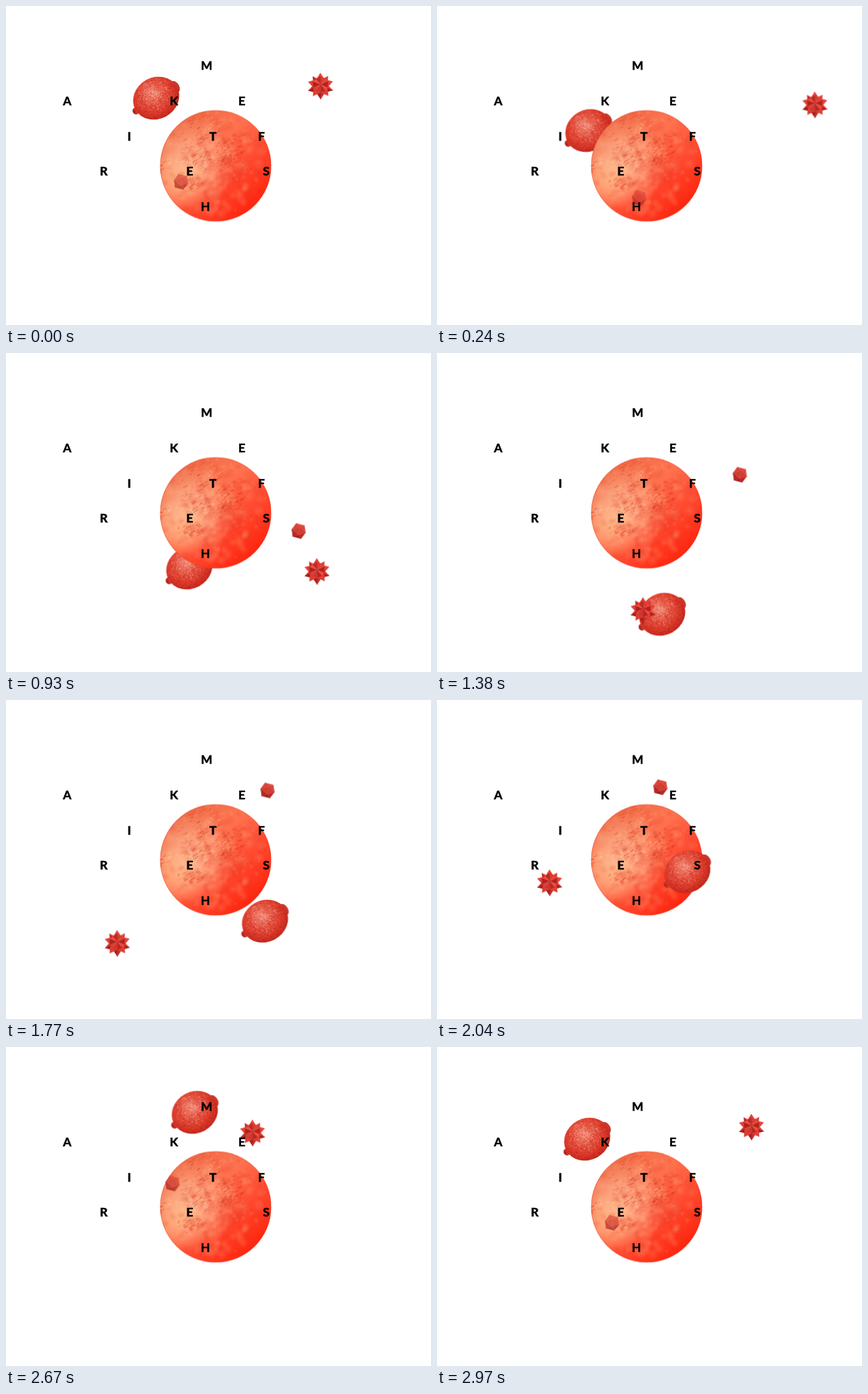
These frames come from a looping animation (600 px wide and 450 px high, 3 s). An HTML page with a canvas:

```html
<!DOCTYPE html>
<html lang="en">
<head>
<meta charset="utf-8">
<title>Orbiting fruit and solids</title>
<style>
  html, body { margin: 0; width: 100%; height: 100%; overflow: hidden; background: #fff; }
  canvas, svg { position: absolute; left: 0; top: 0; width: 600px; height: 450px; }
  text { font: 700 17px Lato, "Open Sans", sans-serif; text-anchor: middle; stroke: #000; stroke-width: .5px; }
</style>
</head>
<body>
<canvas id="stage" width="600" height="450"></canvas>
<svg viewBox="0 0 600 450">
  <text y="90" x="283.3">M</text>
  <text y="139.700" x="86.5 237 333">AKE</text>
  <text y="189.500" x="174 292 360.5">ITF</text>
  <text y="239.300" x="138 259.5 367.5">RES</text>
  <text y="289" x="281.5">H</text>
</svg>
<script>
const LOOP = 3000, STEP = 30, CYCLE = LOOP - STEP;
const SUN = [296, 225.5], R = 78.5;
const ctx = document.getElementById('stage').getContext('2d');

let seed = 7;
const rand = () => (seed = (seed * 16807) % 2147483647) / 2147483647;
const spread = () => rand() + rand() + rand() - 1.5;
const rgba = (rgb, a) => `rgba(${rgb},${a})`;
const clamp = v => Math.min(1, Math.max(0, v));

// Off-screen picture with its origin in the middle
function sprite(size, paint) {
  const c = document.createElement('canvas');
  c.width = c.height = size;
  const g = c.getContext('2d');
  g.translate(size / 2, size / 2);
  paint(g);
  return c;
}

function ramp(gradient, ...colors) {
  colors.forEach((c, i) => gradient.addColorStop(i / (colors.length - 1), c));
  return gradient;
}

function spot(g, x, y, r, rgb, alpha) {
  g.fillStyle = ramp(g.createRadialGradient(x, y, 0, x, y, r), rgba(rgb, alpha), rgba(rgb, 0));
  g.fillRect(x - r, y - r, 2 * r, 2 * r);
}

function paintPlanet(g) {
  g.beginPath();
  g.arc(0, 0, R, 0, 7);
  g.clip();
  g.fillStyle = ramp(g.createLinearGradient(-50, -58, 52, 58), '#f06a46', '#ff7450', '#ff4a30', '#ff260f');
  g.fillRect(-R, -R, 2 * R, 2 * R);
  spot(g, -34, -4, 64, '255,210,172', .8);
  spot(g, -52, 22, 44, '255,196,140', .5);

  // Soft mottling
  for (let i = 0; i < 320; i++) {
    const pale = rand() < .5;
    spot(g, spread() * 70, spread() * 70, 2 + rand() * 7, pale ? '255,185,140' : '225,50,28', .2);
  }
  // Rough streaks in clusters, mostly on the upper half
  g.lineCap = 'round';
  for (let c = 0; c < 22; c++) {
    const cx = spread() * 65, cy = spread() * 50 - 20, size = 6 + rand() * 14;
    const rgb = c % 4 ? '210,52,26' : '255,205,165';
    for (let i = 0; i < 32; i++) {
      const x = cx + spread() * size, y = cy + spread() * size, len = rand() * 4.5;
      g.strokeStyle = rgba(rgb, .12 + rand() * .3);
      g.lineWidth = .5 + rand() * 1.3;
      g.beginPath();
      g.moveTo(x, y);
      g.lineTo(x + len, y - len * (.2 + rand() * .6));
      g.stroke();
    }
  }
  g.strokeStyle = rgba('225,60,35', .35);
  g.lineWidth = 2;
  g.beginPath();
  g.arc(0, 0, R, 0, 7);
  g.stroke();
}

function paintLemon(g) {
  g.rotate(-.5);
  const oval = (x, y, rx, ry) => {
    g.beginPath();
    g.ellipse(x, y, rx, ry, 0, 0, 7);
    g.fill();
  };
  g.fillStyle = '#c9382c';
  oval(-34, 2, 4.5, 5);
  oval(31, -1, 6, 9);
  g.fillStyle = ramp(g.createRadialGradient(-1, -8, 0, -1, -8, 41), '#f28a76', '#e85a46', '#df402f', '#bb261c');
  oval(0, 0, 33.5, 29.3);
  for (let i = 0; i < 1500; i++) {
    const a = rand() * Math.PI * 2, r = Math.sqrt(rand());
    const x = Math.cos(a) * r * 32.5, y = Math.sin(a) * r * 28.3;
    const near = clamp(1 - Math.hypot(x + 1, y + 8) / 27);
    g.fillStyle = rand() < near * .75 ? rgba('255,205,190', .5) : rgba('190,24,18', .32);
    g.fillRect(x, y, 1, 1);
  }
  g.fillStyle = rgba('150,25,20', .6);
  oval(-36, 2, 1.5, 2.5);
}

// Icosahedron, with a spike on every face when tip is set
function paintSolid(g, { radius, tip, tilt, turn, roll, dark, bright }) {
  const ring = (i, z) => {
    const a = (i + (z < 0 ? .5 : 0)) * Math.PI * .4;
    return [Math.cos(a) * .8944, Math.sin(a) * .8944, z * .4472];
  };
  const faces = [];
  for (let i = 0; i < 5; i++) {
    const u = ring(i, 1), v = ring(i + 1, 1), l = ring(i, -1), m = ring(i + 1, -1);
    faces.push([[0, 0, 1], u, v], [u, v, l], [l, m, v], [[0, 0, -1], l, m]);
  }
  const mid = f => [0, 1, 2].map(k => (f[0][k] + f[1][k] + f[2][k]) / 3);
  const dot = (a, b) => a[0] * b[0] + a[1] * b[1] + a[2] * b[2];
  const sub = (a, b) => a.map((n, k) => n - b[k]);
  const cross = (a, b) => [a[1] * b[2] - a[2] * b[1], a[2] * b[0] - a[0] * b[2], a[0] * b[1] - a[1] * b[0]];
  const spin = (x, y, a) => [x * Math.cos(a) - y * Math.sin(a), x * Math.sin(a) + y * Math.cos(a)];
  const place = ([x, y, z]) => {
    [x, y] = spin(x, y, turn);
    [y, z] = spin(y, z, tilt);
    return [...spin(x, y, roll), z];
  };
  const sides = !tip ? faces : faces.flatMap(f => {
    const c = mid(f), k = tip / radius / Math.hypot(...c), apex = c.map(n => n * k);
    return [0, 1, 2].map(i => [f[i], f[(i + 1) % 3], apex]);
  });
  sides.map(f => f.map(place)).sort((a, b) => mid(a)[2] - mid(b)[2]).forEach(f => {
    let n = cross(sub(f[1], f[0]), sub(f[2], f[0]));
    const len = Math.hypot(...n) * Math.sign(dot(n, mid(f)));
    n = n.map(v => v / len);
    if (n[2] <= 0) return;
    const lit = clamp(.35 + .7 * dot(n, [.25, -.7, .5]));
    g.fillStyle = g.strokeStyle = `rgb(${dark.map((d, k) => Math.round(d + (bright[k] - d) * lit))})`;
    g.lineWidth = .4;
    g.beginPath();
    f.forEach(p => g.lineTo(p[0] * radius, p[1] * radius));
    g.closePath();
    g.fill();
    g.stroke();
  });
}

const planet = sprite(160, paintPlanet);
const lemon = sprite(90, paintLemon);
const star = sprite(44, g => paintSolid(g, {
  radius: 11.5, tip: 18.5, tilt: .2, turn: .3, roll: 0, dark: [150, 20, 20], bright: [246, 78, 64] }));
const gem = sprite(30, g => paintSolid(g, {
  radius: 11.3, tip: 0, tilt: .6, turn: .2, roll: .35, dark: [160, 28, 26], bright: [228, 74, 62] }));

// Smooth closed curve through points that are evenly spaced in time
function orbit(...points) {
  const n = points.length;
  return t => {
    const u = t / CYCLE * n, i = Math.floor(u), s = u - i;
    const [a, b, c, d] = [n - 1, 0, 1, 2].map(k => points[(i + k) % n]);
    return [0, 1].map(k => {
      const m = (c[k] - a[k]) / 2, q = (d[k] - b[k]) / 2, gap = c[k] - b[k];
      return b[k] + s * (m + s * (3 * gap - 2 * m - q + s * (m + q - 2 * gap)));
    });
  };
}

const starAt = orbit([444, 113], [546, 150], [534, 231], [451, 301], [354, 344],
  [256, 367], [155, 341], [165, 246], [254, 174], [349, 121]);
const lemonAt = orbit([212, 130], [216, 187], [231, 246], [255, 297], [287, 341],
  [334, 372], [366, 309], [350, 232], [316, 158], [266, 92]);
const gemAt = orbit([247, 248], [296, 274], [355, 278], [408, 256], [435, 209],
  [417, 154], [367, 127], [308, 124], [258, 144], [235, 193]);

function put(img, [x, y], alpha = 1) {
  ctx.globalAlpha = alpha;
  ctx.drawImage(img, x - img.width / 2, y - img.height / 2);
}

function draw(now) {
  const t = Math.floor((now % LOOP) / STEP) * STEP % CYCLE;
  const layers = [() => put(planet, SUN), () => put(lemon, lemonAt(t))];
  if (t < CYCLE / 2) layers.reverse();
  const [x, y] = gemAt(t);
  const outside = clamp((Math.hypot(x - SUN[0], y - SUN[1]) - 60) / 30);

  ctx.clearRect(0, 0, 600, 450);
  layers.forEach(layer => layer());
  put(gem, [x, y], .7 + .3 * outside);
  put(star, starAt(t));
  requestAnimationFrame(draw);
}
requestAnimationFrame(draw);
</script>
</body>
</html>
```
